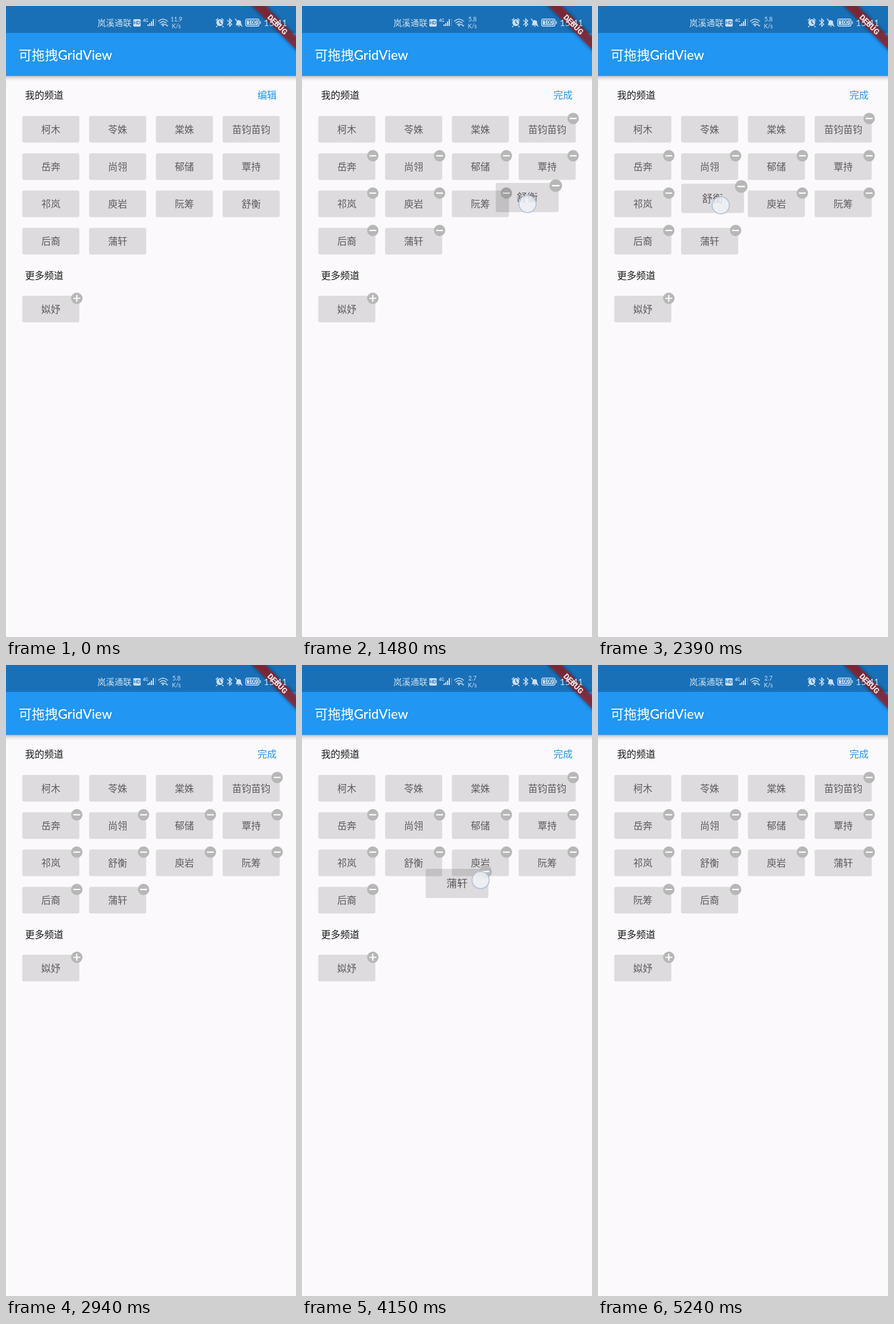
Animation of 508x1102 px, one loop 5270 ms. Source, as an HTML page:

```html
<!DOCTYPE html>
<html lang="zh-CN">
<head>
<meta charset="utf-8">
<title>可拖拽GridView</title>
<style>
  html, body { margin: 0; width: 100%; height: 100%; overflow: hidden; background: #fbf9fc; }
  svg { display: block; width: 100%; height: 100%; }
  text { font-family: Lato, "Noto Sans CJK SC", "Noto Sans CJK", sans-serif; }
  .heading { font-size: 16.8px; fill: #1c1c1c; }
  .label { font-size: 16.8px; fill: #5d5c5d; text-anchor: middle; }
  .status { fill: #cde0f0; }
  .line { fill: none; stroke: #cde0f0; stroke-width: 1.5; stroke-linecap: round; }
  .mid { text-anchor: middle; }
  .tile rect { fill: #000; fill-opacity: .12; }
  .badge circle { fill: #b8b7b8; }
  .badge path { stroke: #fff; stroke-width: 2.2; }
</style>
</head>
<body>
<svg viewBox="0 0 508 1102">
  <defs>
    <linearGradient id="barShadow" x2="0" y2="1">
      <stop offset="0" stop-opacity=".26"/>
      <stop offset=".4" stop-opacity=".1"/>
      <stop offset="1" stop-opacity="0"/>
    </linearGradient>
    <filter id="blur" x="-20%" y="-60%" width="140%" height="220%"><feGaussianBlur stdDeviation="3"/></filter>
  </defs>
  <rect width="508" height="1102" fill="#fbf9fc"/>
  <rect y="122" width="508" height="9" fill="url(#barShadow)"/>
  <rect width="508" height="122" fill="#2196f3"/>
  <rect width="508" height="47" fill="#1a70b7"/>
  <text x="22" y="94" font-size="23" font-weight="500" fill="#fff">可拖拽GridView</text>

  <g transform="translate(508 0) rotate(45)">
    <rect x="-60" y="37.6" width="120" height="16.2" opacity=".5" filter="url(#blur)"/>
    <rect x="-60" y="37.6" width="120" height="16.2" fill="#b71c1c" opacity=".63"/>
    <text class="mid" y="50.5" font-size="13.5" fill="#fff" fill-opacity=".85" style="font-family:Roboto,sans-serif;font-weight:900">DEBUG</text>
  </g>

  <g class="status">
    <text x="160" y="34.5" font-size="15">岚溪通联</text>
    <rect x="223" y="23" width="13" height="13" rx="2"/>
    <text class="mid" x="229.5" y="32.4" font-size="8" font-weight="700" fill="#1a70b7">HD</text>
    <text x="240" y="27.5" font-size="7" font-weight="700">4G</text>
    <path d="M248 32h2v3h-2zM251 30h2v5h-2zM254 27h2v8h-2zM257 23h2v12h-2z"/>
    <path d="M262 22v13" stroke="#cde0f0" stroke-opacity=".4"/>
    <path class="line" d="M267 26.500q8-7 16 0M269.500 29.500q5.500-4.500 11 0M272 32.300q3-2.200 6 0"/>
    <circle cx="275" cy="34" r="1.5"/>
    <path d="M280 31l2 2.500h-4zM282.500 36l-2-2.500h4z"/>
    <text id="speed" class="mid" x="298.5" y="27" font-size="10.5"></text>
    <text class="mid" x="298.5" y="38.500" font-size="10.5">K/s</text>
    <circle cx="374.5" cy="29" r="6"/>
    <path class="line" d="M368 25l3-3M381 25l-3-3M370 35l-1.500 1.500M379 35l1.500 1.500"/>
    <path class="line" d="M374.500 25.500v4l2.500 1.500" style="stroke:#1a70b7"/>
    <path class="line" d="M388 25l7.500 7-3.700 3.500v-13l3.700 3.500-7.500 7"/>
    <path d="M402 33.500c2-2 1.500-4 2-6.500 .5-3 7-3 7.500 0 .5 2.500 0 4.500 2 6.500zM405.500 34.500h4.500q-2.200 3-4.500 0z"/>
    <path class="line" d="M401.500 22.500l12 13"/>
    <rect class="line" x="420" y="22.8" width="23" height="12.4" rx="3"/>
    <rect x="422" y="24.8" width="19" height="8.4" rx="1.5"/>
    <path class="line" d="M445.500 27v4"/>
    <text class="mid" x="431.5" y="32.3" font-size="9" font-weight="700" fill="#1a70b7">100</text>
    <text x="451.5" y="34.5" font-size="16">15:41</text>
  </g>

  <text class="heading" x="33.5" y="162">我的频道</text>
  <text class="heading" x="440.5" y="162" id="mode" style="fill:#2196e8"></text>
  <text class="heading" x="33.5" y="476.5">更多频道</text>
  <g id="tiles"></g>
  <circle id="touch" r="15" fill="#f3f4f9" fill-opacity=".8" stroke="#b6c2dc" stroke-width="1.8"/>
</svg>
<script>
const LOOP = 5270, EDIT_AT = 400, SHIFT = 260, LAG = 70, HOLD = 380;
const byId = id => document.getElementById(id);
const names = ['柯木', '苓姝', '棠姝', '苗钧苗钧', '岳奔', '尚翎', '郁储', '覃持',
  '祁岚', '庾岩', '阮筹', '舒衡', '后裔', '蒲轩'];

const clamp = p => Math.max(0, Math.min(1, p));
const ease = p => (p = clamp(p), p * p * (3 - 2 * p));
const mix = (a, b, p) => a.map((v, i) => v + (b[i] - v) * p);
const slotXY = s => [78.5 + 117 * (s % 4), 215.2 + 65.2 * Math.floor(s / 4)];
const nearestSlot = ([x, y]) => Math.min(names.length - 1,
  Math.round((x - 78.5) / 117) + 4 * Math.round((y - 215.2) / 65.2));

// The finger passes evenly through its points; grip is its offset from the tile's centre.
const drags = [
  { tile: 11, lift: 1000, drop: 2560, grip: [16, 12],
    finger: [{ at: 1250, xy: [446, 348] }, { at: 1880, xy: [307, 342] }, { at: 2330, xy: [215, 348] }] },
  { tile: 13, lift: 3630, drop: 5000, grip: [22.5, 1],
    finger: [{ at: 3800, xy: [218, 410] }, { at: 4270, xy: [345, 364] }, { at: 4450, xy: [475, 366] }] }
];

const fingerXY = ({ finger }, t) => finger.slice(1).reduce((xy, to, i) =>
  mix(xy, to.xy, clamp((t - finger[i].at) / (to.at - finger[i].at))), finger[0].xy);

const heldXY = (drag, t) => fingerXY(drag, t - LAG).map((v, i) => v - drag.grip[i]);

// Whenever a held tile comes over another slot, the tiles between make room.
const moves = names.map((_, slot) => [{ at: -SHIFT, slot }]);
const order = names.map((_, i) => i);
for (const drag of drags) {
  for (let t = drag.finger[0].at; t < drag.drop; t += 5) {
    const slot = nearestSlot(heldXY(drag, t)), from = order.indexOf(drag.tile);
    if (slot === from) continue;
    order.splice(from, 1);
    order.splice(slot, 0, drag.tile);
    order.forEach((tile, s) => {
      if (moves[tile][moves[tile].length - 1].slot !== s) moves[tile].push({ at: t, slot: s });
    });
  }
}

const restXY = (i, t) => moves[i].reduce((xy, m) =>
  mix(xy, slotXY(m.slot), ease((t - m.at) / SHIFT)), slotXY(i));

function makeTile(name, sign) {
  const g = document.createElementNS('http://www.w3.org/2000/svg', 'g');
  g.setAttribute('class', 'tile');
  g.innerHTML = `<rect x="-50" y="-23.25" width="100" height="46.5" rx="3"/>
    <text class="label" y="6.3">${name}</text>
    ${sign ? `<g class="badge" transform="translate(45.5 -18.8)"><circle r="10"/>
      <path d="M-6 0H6${sign === '+' ? 'M0-6V6' : ''}"/></g>` : ''}`;
  byId('tiles').append(g);
  return g;
}

function place(el, [x, y], scale = 1) {
  el.setAttribute('transform', `translate(${x} ${y}) scale(${scale})`);
}

place(makeTile('姒妤', '+'), [78.5, 529.3]);
const tiles = names.map((name, i) => makeTile(name, i > 2 ? '-' : ''));
for (const drag of drags) byId('tiles').append(tiles[drag.tile]);

function draw(t) {
  const editing = t >= EDIT_AT;
  byId('mode').textContent = editing ? '完成' : '编辑';
  byId('speed').textContent = t < 760 ? '11.9' : t < 3000 ? '5.8' : '2.7';

  tiles.forEach((tile, i) => {
    place(tile, restXY(i, t));
    const badge = tile.querySelector('.badge');
    if (badge) badge.style.display = editing ? '' : 'none';
  });

  let touch = t > 220 && t < 380 ? [457, 156] : null;
  for (const drag of drags) {
    const released = ease((t - drag.drop) / 250);
    const held = ease((t - drag.finger[0].at) / 120) - released;
    const scale = 1 + .1 * (ease((t - drag.lift) / 110) - released);
    place(tiles[drag.tile], mix(restXY(drag.tile, t), heldXY(drag, t), held), scale);
    if (t > drag.lift - HOLD && t < drag.drop) touch = fingerXY(drag, t);
  }
  byId('touch').style.display = touch ? '' : 'none';
  if (touch) place(byId('touch'), touch);
}

const start = performance.now();
function frame() {
  draw((performance.now() - start) % LOOP);
  requestAnimationFrame(frame);
}
frame();
</script>
</body>
</html>
```
